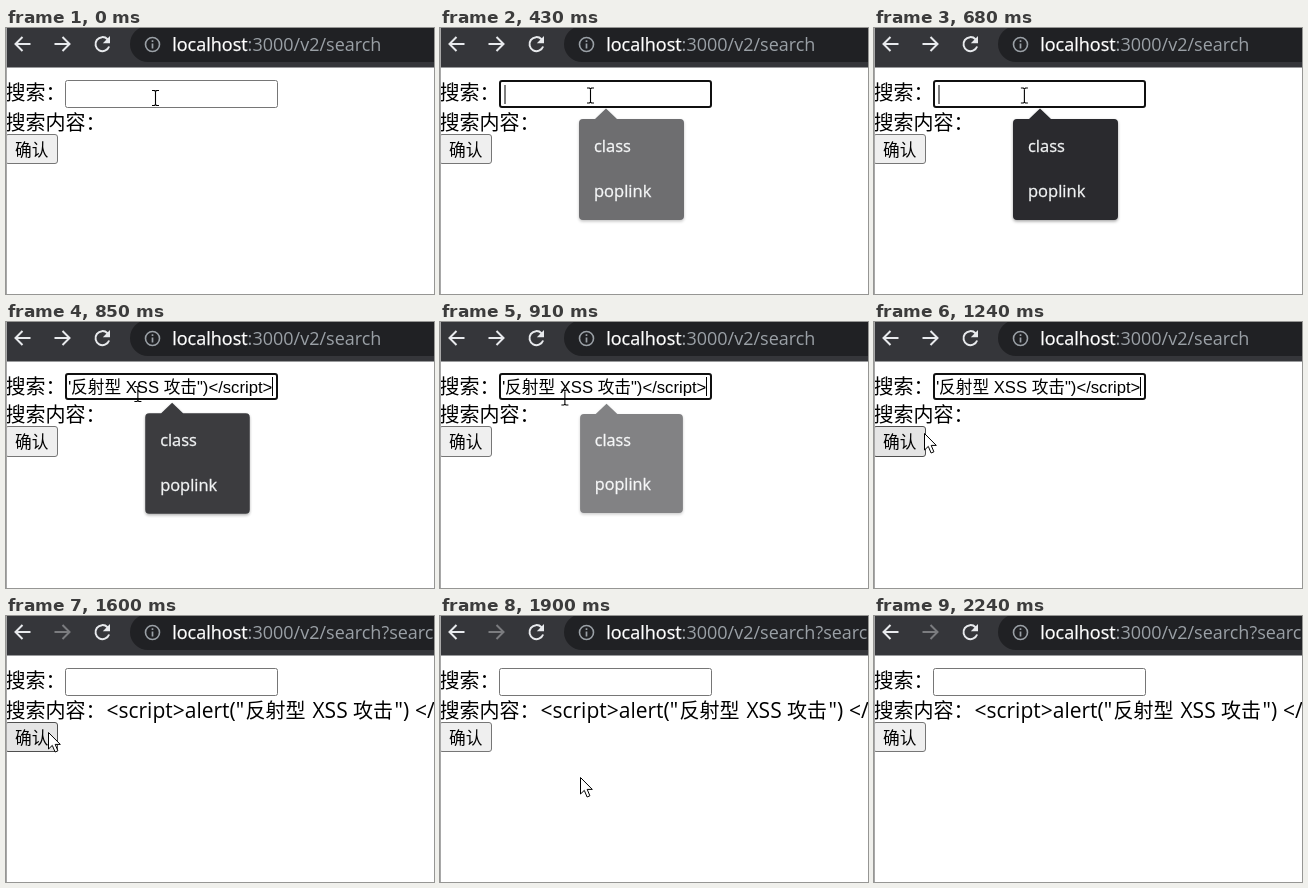
An HTML page for the animation above (2510 ms loop, 428x266 px).

```html
<!DOCTYPE html>
<html lang="zh-CN">
<head>
<meta charset="utf-8">
<title>Search</title>
<style>
html, body { margin: 0; width: 100%; height: 100%; overflow: hidden; background: #fff; }
svg { display: block; width: 428px; height: 266px; }
text { white-space: pre; }
.ui { font-family: "Open Sans", "Noto Sans CJK SC", "Noto Sans CJK", sans-serif; }
.page { font: 20px "Noto Sans CJK SC", "Noto Sans CJK", sans-serif; }
.latin { font: 21px "Open Sans", sans-serif; }
.control { font: 16.67px "Liberation Sans", "Noto Sans CJK SC", "Noto Sans CJK", sans-serif; }
</style>
</head>
<body>
<svg viewBox="0 0 428 266" lang="zh-CN">
  <defs>
    <clipPath id="inputClip"><rect x="62" y="52" width="208" height="28"/></clipPath>
    <filter id="shadow" x="-20%" y="-20%" width="140%" height="140%">
      <feDropShadow dx="0" dy="1.5" stdDeviation="1.5" flood-opacity=".35"/>
    </filter>
  </defs>
  <rect width="428" height="266" fill="#fff"/>

  <!-- browser toolbar -->
  <rect width="428" height="39.500" fill="#35363a"/>
  <rect x="124" y="-2" width="340" height="36" rx="18" fill="#202124"/>
  <g transform="translate(-.5 0)">
    <g fill="none" stroke="#e8eaed" stroke-width="2">
      <path d="M25 16H10M17 9L10 16L17 23"/>
      <path id="forward" d="M49 16H64M57 9L64 16L57 23"/>
      <path d="M102 11.2A7 7 0 1 0 103.6 18.5"/>
    </g>
    <path d="M104.5 8V15.2H97.3Z" fill="#e8eaed"/>
    <circle cx="147" cy="16.500" r="7" fill="none" stroke="#9aa0a6" stroke-width="1.600"/>
    <path d="M147 15.500V20.500M147 12.300V14" stroke="#9aa0a6" stroke-width="1.700"/>
    <text class="ui" x="166.700" y="23" font-size="18" fill="#9aa0a6"><tspan fill="#fff" stroke="#fff" stroke-width=".25">localhost</tspan>:3000/v2/search<tspan id="query">?search=</tspan></text>
  </g>

  <!-- page -->
  <text class="page" x="-.5" y="71.500">搜索：</text>
  <rect id="input" rx="2" fill="#fff"/>
  <g clip-path="url(#inputClip)">
    <text id="typed" class="control" x="266.300" y="71" text-anchor="end">"反射型 XSS 攻击")&lt;/script&gt;</text>
  </g>
  <rect id="caret" width="1" height="19"/>
  <g id="lower">
    <text class="page" x="-.5" y="102">搜索内容：</text>
    <g id="result">
      <text class="latin" x="100.500" y="102">&lt;script&gt;alert("</text>
      <text class="page" x="239.500" y="102">反射型</text>
      <text class="latin" x="306.500" y="102">XSS</text>
      <text class="page" x="347" y="102">攻击</text>
      <text class="latin" x="388.500" y="102">")</text>
      <text class="latin" x="409" y="102">&lt;/script&gt;</text>
    </g>
    <rect id="button" x="-.5" y="106.500" width="52" rx="2.500"/>
    <text class="control" x="9" y="128">确认</text>
  </g>
  <rect width="1" height="266" fill="#a8a8a8"/>

  <g id="popup">
    <path d="M143 91H155L166 80.500L177 91H240A4 4 0 0 1 244 95V188A4 4 0 0 1 240 192H143A4 4 0 0 1 139 188V95A4 4 0 0 1 143 91Z" fill="#292a2d" filter="url(#shadow)"/>
    <g class="ui" font-size="16.500" fill="#f1f3f4" stroke="#f1f3f4" stroke-width=".3">
      <text x="154" y="124">class</text>
      <text x="154" y="169">poplink</text>
    </g>
  </g>

  <path id="beam" d="M-3.500 -7.500H-1L0 -6.500L1 -7.500H3.500M0 -7V7M-3.500 7.500H-1L0 6.500L1 7.500H3.500" fill="none" stroke="#000" stroke-width="1.100"/>
  <path id="arrow" d="M.5 .5V17L4.300 13.400L7.100 20L9.900 18.800L7.200 12.400H12.300Z" fill="#fff" stroke="#000"/>
</svg>
<script>
const LOOP = 2510;
const FOCUS = 340, PASTE = 820, PRESS = 1420, SUBMIT = 1480, EXIT = 2220;
// time, x, y of the pointer
const path = [
  [0, 149.5, 70], [30, 149.5, 70], [90, 150.5, 67.5], [680, 150.5, 67.5],
  [850, 132, 72], [970, 118, 79], [1060, 92, 93], [1150, 57, 108],
  [1240, 50, 111], [1390, 43, 115], [1450, 42, 116], [1720, 42, 116]
];
const el = id => document.getElementById(id);
const set = (id, attrs) => {
  for (const name in attrs) el(id).setAttribute(name, attrs[name]);
};
const show = (id, on) => set(id, { display: on ? "inline" : "none" });
const progress = (t, a, b) => Math.min(1, Math.max(0, (t - a) / (b - a)));
const smooth = p => p * p * (3 - 2 * p);

function pointer(t) {
  if (t >= 1720) {
    const p = smooth(progress(t, 1720, EXIT));
    return [42 + 330 * p, 116 + 150 * p];
  }
  const i = path.findIndex(k => k[0] > t);
  const [a, b] = [path[i - 1], path[i]];
  const p = progress(t, a[0], b[0]);
  return [a[1] + (b[1] - a[1]) * p, a[2] + (b[2] - a[2]) * p];
}

function draw(t) {
  const [x, y] = pointer(t);
  const submitted = t >= SUBMIT;
  const focused = t >= FOCUS && !submitted;
  const pasted = t >= PASTE && !submitted;

  set("input", focused
    ? { x: 60, y: pasted ? 52 : 53, width: 211, height: pasted ? 25 : 26, stroke: "#101010", "stroke-width": 2 }
    : { x: 59.5, y: 52.5, width: 212, height: 27, stroke: "#767676", "stroke-width": 1 });
  show("typed", pasted);
  show("caret", focused);
  set("caret", pasted ? { x: 266, y: 55 } : { x: 64.5, y: 57 });
  set("lower", { transform: `translate(0 ${pasted ? -2 : 0})` });
  show("result", submitted);
  show("query", submitted);
  set("forward", { stroke: submitted ? "#7b7c7f" : "#e8eaed" });

  const hover = x < 52 && y > 104 && y < 135;
  const pressed = t >= PRESS && !submitted;
  set("button", {
    height: pasted ? 30 : 29,
    fill: pressed ? "#f5f5f5" : hover ? "#e5e5e5" : "#efefef",
    stroke: pressed ? "#8d8d8d" : hover ? "#4f4f4f" : "#767676"
  });

  const fadeOut = progress(t, 835, 1017);
  const scale = 1 - .05 * fadeOut;
  show("popup", t > 370 && fadeOut < 1);
  set("popup", {
    opacity: progress(t, 370, 460) * (1 - fadeOut),
    transform: `translate(191.5 141.5) scale(${scale}) translate(-191.5 -141.5)`
  });

  const overInput = x > 59 && y < 78;
  show("beam", overInput);
  show("arrow", !overInput && t < EXIT);
  set("beam", { transform: `translate(${x} ${y})` });
  set("arrow", { transform: `translate(${Math.round(x)} ${Math.round(y)})` });
}

const start = performance.now();
function tick() {
  draw((performance.now() - start) % LOOP);
  requestAnimationFrame(tick);
}
tick();
</script>
</body>
</html>
```
